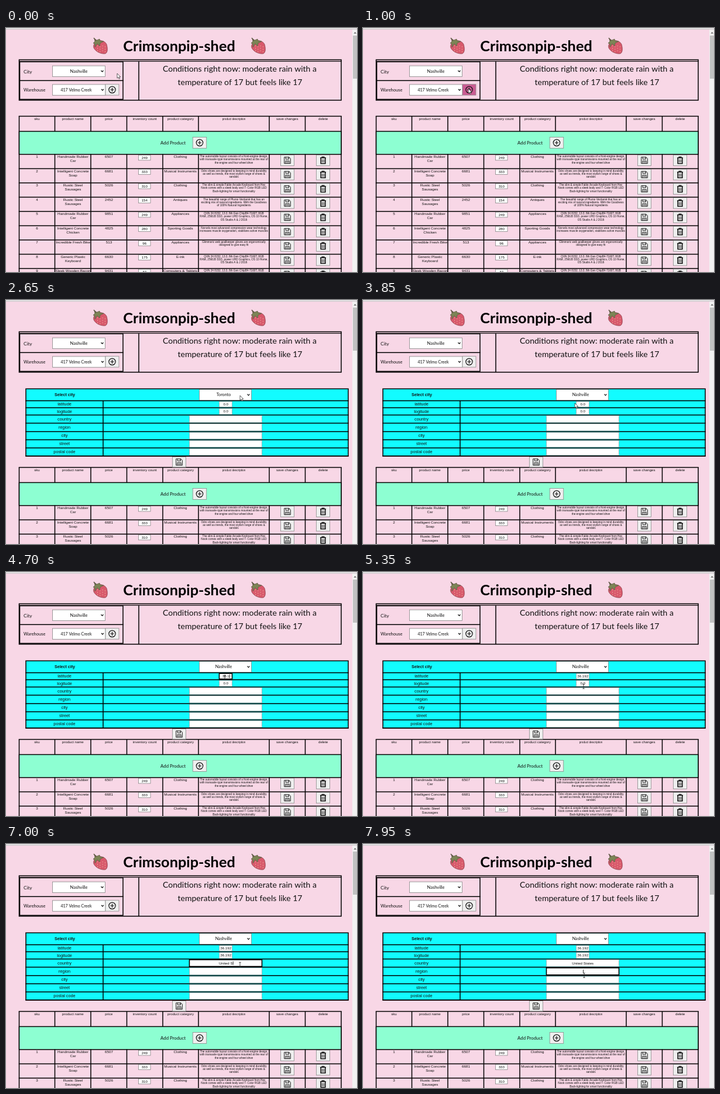
Recreate the animation shown at these times as an HTML page with a canvas. Size 600 px wide and 419 px high, loop 8 s.

```html
<!DOCTYPE html>
<html lang="en">
<head>
<meta charset="utf-8">
<title>Store inventory</title>
<style>
html, body { margin: 0; width: 100%; height: 100%; overflow: hidden; background: #f8d7e6; }
canvas { display: block; width: 100vw; height: 100vh; }
</style>
</head>
<body>
<canvas id="stage"></canvas>
<script>
const W = 600, H = 419, LOOP = 8000;
const SANS = '"Liberation Sans", sans-serif';
const HAND = 'Lato, sans-serif';
const PINK = '#f8d7e6', CYAN = '#12fcff', MINT = '#8dffd2', INK = '#111';
const canvas = document.getElementById('stage');
const ctx = canvas.getContext('2d');

const OPEN_AT = 1350, CITY_AT = 3050, SHIFT = 136;
const COLS = [22.5, 83.5, 145, 206.5, 268, 329, 450, 511.5, 573];
const HEADS = ['sku', 'product name', 'price', 'inventory count', 'product category',
  'product description', 'save changes', 'delete'];
const LAPTOP = 'QVN 24 8152, 13.3, 8th Gen ChipB4-7160T, 8GB|RAM, 256GB SSD, power UHD Graphics, OS 10 Home,|OS Studio A & J 2016';
const ROWS = [
  ['Handmade Rubber|Car', 6507, 249, 'Clothing', 'The automobile layout consists of a front-engine design,|with transaxle-type transmissions mounted at the rear of|the engine and four wheel drive'],
  ['Intelligent Concrete|Soap', 6681, 333, 'Musical Instruments', 'Odro shoes are designed to keeping in mind durability|as well as trends, the most stylish range of shoes &|sandals'],
  ['Rustic Steel|Sausages', 5026, 310, 'Clothing', 'The slim & simple Fable Arcade Keyboard from Hex|Nook comes with a sleek body and 7- Color RGB LED|Back-lighting for smart functionality'],
  ['Rustic Steel|Sausages', 2452, 154, 'Antiques', 'The beautiful range of Plumo Verdanié that has an|exciting mix of natural ingredients. With the Goodness|of 100% Natural Ingredients'],
  ['Handmade Rubber|Car', 9851, 249, 'Appliances', LAPTOP],
  ['Intelligent Concrete|Chicken', 4825, 280, 'Sporting Goods', 'Norvels most advanced compression wear technology|increases muscle oxygenation, stabilizes active muscles'],
  ['Incredible Fresh Bike', 513, 96, 'Appliances', 'Glimmoric web goalkeeper gloves are ergonomically|designed to give easy fit'],
  ['Generic Plastic|Keyboard', 6630, 175, 'E-ink', LAPTOP],
  ['Sleek Wooden Bacon', 9431, 37, 'Computers & Tablets', LAPTOP]
];

// Pointer stops: time, x, y
const PATH = [
  [0, 190, 78], [350, 190, 78], [800, 180, 104], [1320, 180, 104], [1780, 402, 177],
  [1900, 402, 177], [2200, 400, 164], [2700, 400, 164], [3000, 368, 186], [3300, 368, 186],
  [3800, 362, 177], [3900, 362, 177], [4050, 374, 180], [5000, 374, 180], [5300, 377, 195.5],
  [5400, 377, 195.5], [5900, 377, 194], [6150, 400, 206], [7350, 400, 206], [7750, 378, 224.6]
];

// Form fields: label, row top, row bottom, input width, base value, typed value,
// focus start, focus end, typing start, typing end
const FIELDS = [
  ['latitude', 173, 185, 22, '0.0', '36.192', 4080, 5150, 4350, 4950],
  ['logitude', 185, 197.5, 22, '0.0', '36.192', 5420, 6000, 5500, 5900],
  ['country', 197.5, 211.5, 124, '', 'United States', 6050, 7600, 6500, 7400],
  ['region', 211.5, 226, 124, '', '', 7650, 8000, 8000, 8000],
  ['city', 226, 240, 124],
  ['street', 240, 254, 124],
  ['postal code', 254, 268, 124]
];

function pointer(t) {
  let i = PATH.length - 1;
  while (i > 0 && PATH[i][0] > t) i--;
  const a = PATH[i], b = PATH[i + 1] || a;
  const u = b === a ? 0 : (t - a[0]) / (b[0] - a[0]);
  const e = u * u * (3 - 2 * u);
  return { x: a[1] + (b[1] - a[1]) * e, y: a[2] + (b[2] - a[2]) * e };
}

const within = (p, x, y, w, h) => p.x >= x && p.x <= x + w && p.y >= y && p.y <= y + h;

function fill(x, y, w, h, color) {
  ctx.fillStyle = color;
  ctx.fillRect(x, y, w, h);
}
const hline = (x1, x2, y, w = 1.5) => fill(x1 - w / 2, y - w / 2, x2 - x1 + w, w, '#000');
const vline = (x, y1, y2, w = 1.5) => fill(x - w / 2, y1, w, y2 - y1, '#000');

function frame(x, y, w, h, color = '#000', width = 1.5) {
  ctx.strokeStyle = color;
  ctx.lineWidth = width;
  ctx.strokeRect(x, y, w, h);
}

function text(s, x, y, size, family = SANS, align = 'center', weight = 400, color = INK) {
  ctx.font = `${weight} ${size}px ${family}`;
  ctx.textAlign = align;
  ctx.fillStyle = color;
  ctx.fillText(s, x, y);
}
const lines = (s, x, y, size, step) =>
  s.split('|').forEach((l, i) => text(l, x, y + i * step, size));

function stroke(path, color, width) {
  ctx.strokeStyle = color;
  ctx.lineWidth = width;
  ctx.stroke(new Path2D(path));
}

function at(x, y, draw) {
  ctx.save();
  ctx.translate(x, y);
  draw();
  ctx.restore();
}

function button(x, y, icon, w = 23, h = 18.5, bg = '#efefef') {
  fill(x - w / 2, y - h / 2, w, h, bg);
  frame(x - w / 2, y - h / 2, w, h, '#8a8a8a', 0.8);
  at(x, y, icon);
}

function plusIcon() {
  ctx.beginPath();
  ctx.arc(0, 0, 5.7, 0, Math.PI * 2);
  ctx.strokeStyle = INK;
  ctx.lineWidth = 1.2;
  ctx.stroke();
  stroke('M-3.2 0H3.2M0 -3.2V3.2', INK, 1.2);
}

function saveIcon() {
  stroke('M-5.3 -5.5H3L5.4 -3V5.5H-5.3ZM-2.8 -5.5V-2H2.5V-5.5M-3.2 5.5V1H3.2V5.5', '#222', 1);
  stroke('M-2 2.6H2M-2 4.1H2M1 -4.8V-3', '#222', 0.6);
}

function trashIcon() {
  stroke('M-5 -4.2H5M-1.8 -4.6V-5.8H1.8V-4.6', INK, 1.4);
  stroke('M-3.8 -3.6V5.6H3.8V-3.6', INK, 1.6);
  stroke('M-1.4 -1.8V3.8M1.4 -1.8V3.8', INK, 1.1);
}

function select(value, x, y, w, size, textX) {
  fill(x, y, w, 18.5, '#fff');
  frame(x, y, w, 18.5, '#858585', 0.8);
  text(value, textX, y + 11.8, size, HAND);
  at(x + w - 5, y + 9, () => stroke('M-2 -1L0 1.2L2 -1', INK, 1.2));
}

function berry(x, y) {
  at(x, y, () => {
    ctx.fillStyle = '#d8596c';
    const body = 'M-9 -5C-4 -12 8 -10 11 -3C13 4 13 11 9 13C2 14 -8 10 -11 3C-12 0 -11 -3 -9 -5Z';
    ctx.fill(new Path2D(body));
    stroke(body, '#8d4650', 0.8);
    for (let i = 0; i < 12; i++) {
      const sx = -5 + (i % 4) * 4.3, sy = -1 + Math.floor(i / 4) * 4.2 + (i % 2) * 1.6;
      fill(sx, sy, 1, 1.4, '#f3b59d');
    }
    const leaf = 'M-10 -13L-6 -10L-1 -12L0 -9L6 -8L0 -5L-1 0L-5 -4L-9 2L-9 -4L-12 -5L-9 -8Z';
    ctx.fillStyle = '#7c8455';
    ctx.fill(new Path2D(leaf));
    stroke(leaf, '#5d5643', 0.7);
    stroke('M-7 -9L-11 -14', '#5d5643', 1.4);
  });
}

function drawHeader(p) {
  berry(161, 31);
  berry(431, 31);
  text('Crimsonpip-shed', 296, 40, 25.3, HAND, 'center', 700, '#000');

  frame(22.5, 54.5, 550.5, 69.5);
  hline(22.5, 573, 57.2, 1.2);
  frame(23.5, 58, 176.5, 64.5);
  hline(23.5, 200, 90.3);
  vline(227, 57, 124);

  text('City', 30, 77.5, 8.2, HAND, 'left');
  text('Warehouse', 30, 109, 7.5, HAND, 'left');
  select('Nashville', 79.5, 65, 90, 7.5, 124.5);
  select('417 Velmo Creek', 79.5, 97, 90.5, 7, 120);
  const hot = within(p, 170, 97, 23, 18.5);
  button(181.5, 106, plusIcon, 23, 18.5, hot ? '#c95c92' : '#efefef');

  text('Conditions right now: moderate rain with a', 399.5, 75, 14, HAND);
  text('temperature of 17 but feels like 17', 400, 98, 14, HAND);
}

function drawField(f, t) {
  const [label, top, bottom, w, base = '', typed = '', on, off, start, end] = f;
  const mid = (top + bottom) / 2, h = bottom - top - 2.4;
  const x = 375.5 - w / 2, y = mid - h / 2;
  text(label, 100, mid + 2.3, 7.3);
  hline(34, 585, bottom);
  fill(x, y, w, h, '#fff');

  const focused = t >= on && t < off;
  frame(x, y, w, h, focused ? '#000' : '#888', focused ? 1.6 : 0.6);
  let value = base;
  if (t >= start) {
    const n = Math.min(1, (t - start) / (end - start));
    value = typed.slice(0, Math.ceil(n * typed.length));
  }
  ctx.save();
  ctx.beginPath();
  ctx.rect(x + 1, y, w - 2, h);
  ctx.clip();
  text(value, 375.7, mid + 2.2, 6.15);
  const typing = t >= start && t < end;
  if (focused && (typing || (t - on) % 1060 < 530)) {
    const caret = 376 + ctx.measureText(value).width / 2;
    fill(Math.min(caret, x + w - 2), mid - 3, 0.8, 6, '#000');
  }
  ctx.restore();
}

function drawForm(t) {
  fill(34, 152.5, 551, 115.5, CYAN);
  text('Select city', 100.5, 165, 7.1, SANS, 'center', 700);
  select(t < CITY_AT ? 'Toronto' : 'Nashville', 330.5, 153.6, 89, 7.2, 372);
  hline(34, 585, 173);
  FIELDS.forEach(f => drawField(f, t));
  vline(166, 173, 268);
  frame(34, 152.5, 551, 115.5);
  button(296, 278.3, saveIcon, 23, 17.5);
}

function drawRow(row, i) {
  const y = 217 + i * 24.5;
  const [name, price, count, category, about] = row;
  text(i + 1, 53, y + 6.4, 6.2);
  lines(name, 114.5, y + 6.4, 6.25, 6.6);
  text(price, 176, y + 6.4, 6.25);
  fill(226.5, y + 1.2, 20.5, 8.8, '#fff');
  frame(226.5, y + 1.2, 20.5, 8.8, '#777', 0.7);
  text(count, 236.8, y + 7.9, 6.2);
  text(category, 298, y + 6.4, 6.25);
  lines(about, 389.5, y + 5, 4.7, 5.4);
  button(481, y + 10.2, saveIcon);
  button(542, y + 10.2, trashIcon);
  hline(22.5, 573, y + 24.5);
}

function drawTable() {
  HEADS.forEach((h, i) =>
    text(h, (COLS[i] + COLS[i + 1]) / 2, 157.5, i === 5 ? 4.7 : 6.05));
  ROWS.forEach(drawRow);
  COLS.forEach(x => vline(x, 151.5, 440));
  hline(22.5, 573, 151.5);
  fill(22.5, 178, 550.5, 38.5, MINT);
  frame(22.5, 177.5, 550.5, 39.5);
  text('Add Product', 285.5, 200, 7.8, HAND);
  button(331, 197, plusIcon, 23.5, 19);
}

function drawChrome() {
  fill(0, 0, W, 2, '#e3e1e3');
  fill(0, 2, W, 0.8, '#c9c3c7');
  fill(592, 2.8, 8, H, '#f1f1f1');
  fill(593, 13, 7, 74, '#c1c1c1');
  ctx.fillStyle = '#666';
  ctx.fill(new Path2D('M594.5 9.5L596.7 6.7L599 9.5Z'));
}

function drawPointer(p, open) {
  const overInput = open && FIELDS.some(([, top, bottom, w]) =>
    within(p, 375.5 - w / 2, top + 1.2, w, bottom - top - 2.4));
  at(p.x, p.y, () => {
    if (overInput) {
      stroke('M-1.8 -2.8H1.8M-1.8 4.8H1.8M0 -2.8V4.8', '#222', 0.8);
      return;
    }
    const arrow = new Path2D('M0 0V8.2L1.9 6.5L3.2 9.5L4.6 8.9L3.3 6H5.8Z');
    ctx.fillStyle = '#fff';
    ctx.fill(arrow);
    stroke(arrow, '#222', 0.7);
  });
}

function draw(t) {
  const open = t >= OPEN_AT, p = pointer(t);
  fill(0, 0, W, H, PINK);
  drawHeader(p);
  at(0, open ? SHIFT : 0, drawTable);
  if (open) drawForm(t);
  drawChrome();
  drawPointer(p, open);
}

function resize() {
  const dpr = window.devicePixelRatio || 1;
  canvas.width = Math.round(innerWidth * dpr);
  canvas.height = Math.round(innerHeight * dpr);
}

const began = performance.now();
function tick() {
  ctx.setTransform(canvas.width / W, 0, 0, canvas.height / H, 0, 0);
  draw((performance.now() - began) % LOOP);
  requestAnimationFrame(tick);
}
addEventListener('resize', resize);
resize();
tick();
</script>
</body>
</html>
```
